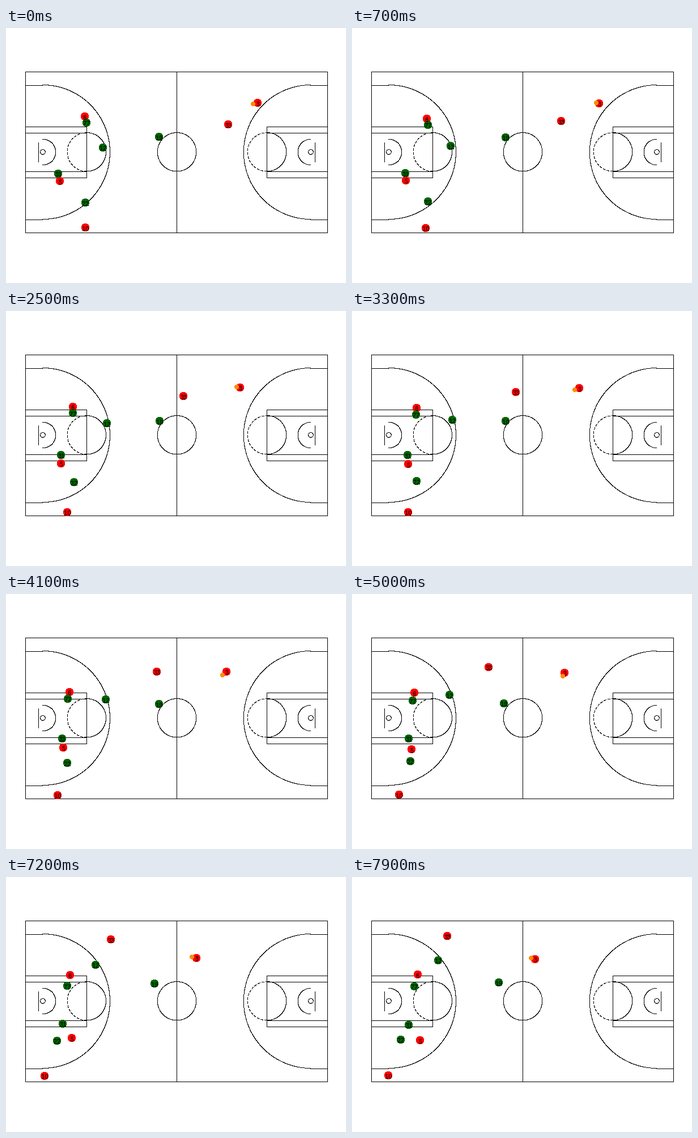
A matplotlib script for the animation above (8000 ms loop, 600 by 450 pixels).

```python
import numpy as np
import matplotlib.pyplot as plt
from matplotlib.animation import FuncAnimation
from matplotlib.patches import Circle

plt.rcParams["text.antialiased"] = False
plt.rcParams["font.family"] = "Liberation Sans"

W, H, DPI = 600, 450, 100
FRAMES, STEP = 80, 100
PX = 72 / DPI

# Each player runs one smooth curve: start, halfway point, end
RED = {
    "3": [(444, 132), (391.5, 137), (323, 145)],
    "33": [(392, 170), (270.5, 138), (168, 104)],
    "6": [(139, 156), (112, 173), (116, 172)],
    "5": [(95, 270), (101, 271), (120, 288)],
    "10": [(140, 352), (92.5, 355), (64, 350)],
}
GREEN = {
    "19": [(270, 192), (270, 194), (259, 186)],
    "12": [(171, 211), (176, 187), (152, 147)],
    "77": [(142, 167), (110, 185), (110, 193)],
    "31": [(92, 257), (99, 254.5), (100, 261)],
    "22": [(140, 308), (109.5, 298), (86, 287)],
}


def glide(path, u):
    """Parabola through three points, u from 0 to 1."""
    a, b, c = np.array(path)
    return (1 - 2 * u) * (1 - u) * a + 4 * u * (1 - u) * b + u * (2 * u - 1) * c


def dribble(t):
    """Ball offset from its carrier; t in seconds."""
    return np.array([-5.5 + 3 * np.cos(2 * np.pi * (t - 1.6) / 3.8),
                     1.8 + 4.3 * np.cos(2 * np.pi * (t - 4.6) / 6)])


fig = plt.figure(figsize=(W / DPI, H / DPI), dpi=DPI, facecolor="white")
ax = fig.add_axes([0, 0, 1, 1])
ax.set_xlim(-0.5, W - 0.5)
ax.set_ylim(H - 0.5, -0.5)
ax.axis("off")


def seg(xs, ys):
    ax.plot(np.round(xs), ys, color="black", lw=PX, snap=False,
            solid_capstyle="projecting", solid_joinstyle="miter")


def arc(cx, cy, r, start=0, end=360, dashed=False):
    """Hard one-pixel curve made of single pixels."""
    a = np.radians(np.linspace(start, end, int(r * 16)))
    if dashed:
        a = a[(a - a[0]) * r % 7 < 4]
    ax.plot(cx + r * np.cos(a) - 0.5, cy + r * np.sin(a) - 0.5, ",", color="black")


def half_court(mirror=None):
    def mx(*xs):
        xs = np.array(xs)
        return xs if mirror is None else mirror - xs

    cy, edge, hoop, lane = 219.3, 34.4, 64.4, 141.8
    inward = -90 if mirror is None else 90
    for y in (101, 338):
        seg(mx(edge, hoop), [y, y])
    for y in (174, 185, 253, 264):
        seg(mx(edge, lane), [y, y])
    seg(mx(lane, lane), [174, 264])
    seg(mx(56.8, 56.8), [202, 236])
    for r in (118.5, 22.8):
        arc(mx(hoop), cy + 0.2, r, inward, inward + 180)
    arc(mx(hoop), cy, 4.3)
    arc(mx(lane), cy, 34.2, -90, 90)
    arc(mx(lane), cy, 34.2, 90, 270, dashed=True)


seg([34, 567, 567, 34, 34], [77, 77, 361, 361, 77])
seg([301, 301], [77, 361])
arc(301, 219.3, 34.2)
half_court()
half_court(mirror=601.8)


def disc(radius, color, z):
    return ax.add_patch(Circle((0, 0), radius, fc=color, lw=0, antialiased=False,
                               snap=False, zorder=z))


players = []
for team, color in ((RED, "#ff0000"), (GREEN, "#006400")):
    for number, path in team.items():
        dot = disc(6.5, color, 10)
        label = ax.text(0, 0, number, fontsize=11 * PX, ha="center",
                        va="baseline", zorder=20)
        players.append((path, dot, label))
ball = disc(3.3, "#ff8c00", 30)


def draw(n):
    u = n / (FRAMES - 1)
    for path, dot, label in players:
        x, y = np.round(glide(path, u))
        dot.center = x - 0.5, y - 0.5
        label.set_position((x, y + 5))
    bx, by = np.round(glide(RED["3"], u) + dribble(n * STEP / 1000))
    ball.center = bx - 0.5, by - 0.5
    return []


anim = FuncAnimation(fig, draw, frames=FRAMES, interval=STEP, repeat=True,
                     repeat_delay=0, blit=False)
plt.show()
```
